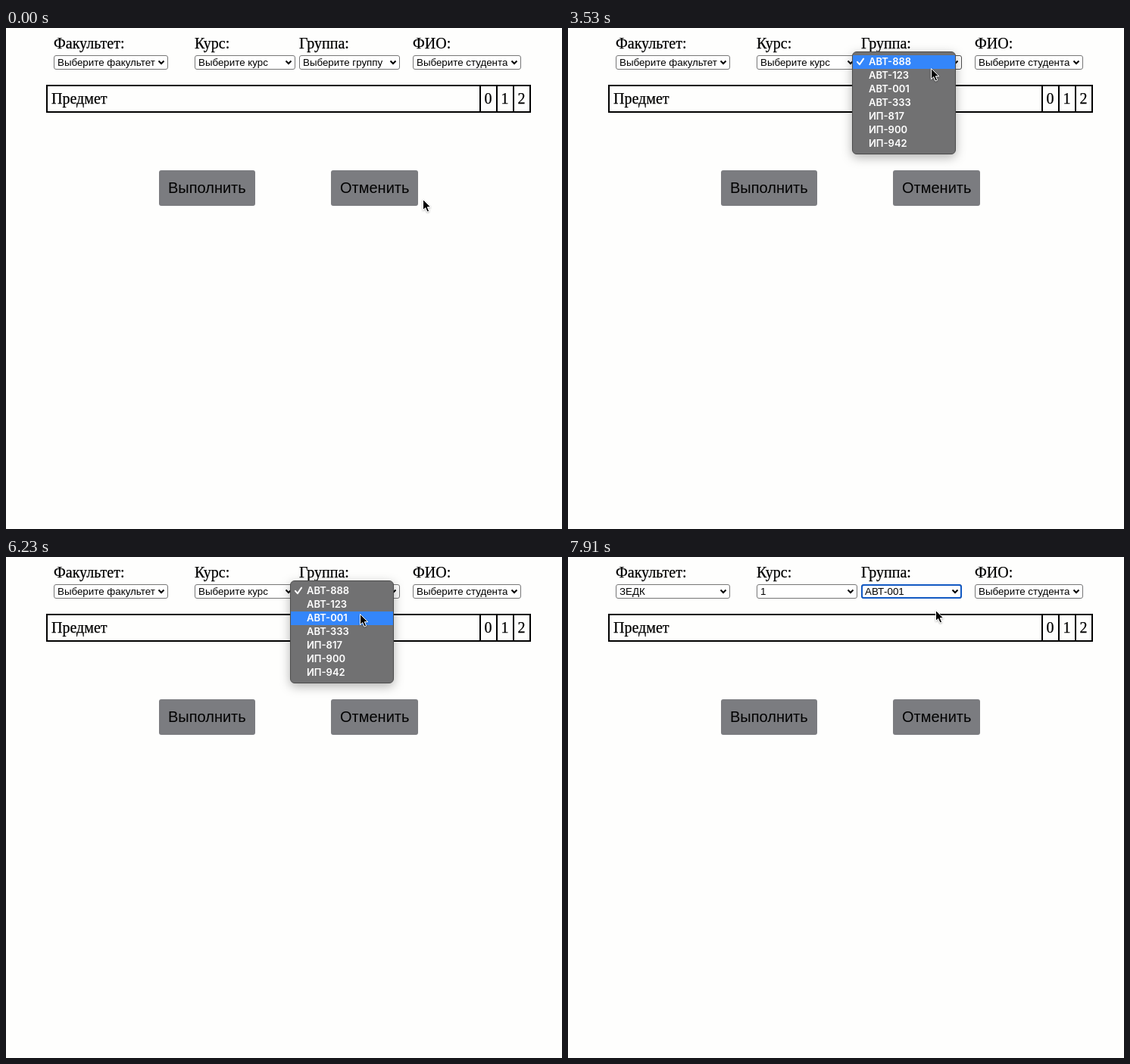
Write an HTML page that moves like this. It is 734 px wide and 662 px high and loops after 8000 ms.

```html
<!DOCTYPE html>
<html lang="ru">
<head>
<meta charset="utf-8">
<title>Выбор студента</title>
<style>
  html, body { margin: 0; width: 100%; height: 100%; overflow: hidden; background: #fefefd; }
  svg { display: block; width: 734px; height: 662px; }
  text { white-space: pre; }
  .serif { font: 20px "Liberation Serif", "Times New Roman", serif; stroke: #000; stroke-width: .25px; }
  .field { font: 13.333px "Liberation Sans", Arial, sans-serif; }
  .button { font: 20px "Liberation Sans", Arial, sans-serif; }
  .item { font: 600 13px Inter, sans-serif; fill: #fff; }
</style>
</head>
<body>
<svg id="stage" viewBox="0 0 734 662">
  <defs>
    <filter id="shadow" x="-30%" y="-30%" width="160%" height="160%">
      <feDropShadow dx="0" dy="4" stdDeviation="7" flood-color="#000" flood-opacity=".3"/>
    </filter>
    <filter id="soft" x="-50%" y="-50%" width="200%" height="200%">
      <feDropShadow dx="0" dy="1" stdDeviation="1.2" flood-color="#000" flood-opacity=".35"/>
    </filter>
  </defs>
</svg>
<script>
const LOOP = 8000;
const OPEN = 2850, FADE = 6930, CLOSED = 7170, PICKED = 7200;
const ROW_TOP = 36, ROW_H = 18;
const stage = document.getElementById('stage');

function add(parent, tag, attrs, content) {
  const el = document.createElementNS('http://www.w3.org/2000/svg', tag);
  for (const key in attrs) el.setAttribute(key, attrs[key]);
  if (content !== undefined) el.textContent = content;
  parent.appendChild(el);
  return el;
}

const label = (x, y, content, cls = 'serif', parent = stage) =>
  add(parent, 'text', { x, y, class: cls }, content);

function field(x, width, title, hint, value) {
  label(x, 27, title);
  const box = add(stage, 'rect', {
    x: x + .5, y: 36.5, width: width - 1, height: 18, rx: 2.5, fill: '#fff', stroke: '#767676'
  });
  const text = label(x + 5, 50, hint, 'field');
  add(stage, 'path', {
    d: `M${x + width - 12.5} 43.5l3.5 3.5 3.5-3.5`, fill: 'none', stroke: '#000', 'stroke-width': 2
  });
  return { box, text, hint, value };
}

function button(x, width, content) {
  add(stage, 'rect', { x, y: 188, width, height: 47, rx: 3, fill: '#7b7c80' });
  label(x + 12, 218, content, 'button');
}

const fields = [
  field(63, 151, 'Факультет:', 'Выберите факультет', 'ЗЕДК'),
  field(249, 133, 'Курс:', 'Выберите курс', '1'),
  field(387, 133, 'Группа:', 'Выберите группу', 'АВТ-001'),
  field(537, 143, 'ФИО:', 'Выберите студента', 'Выберите студента')
];
const group = fields[2].box;
const ring = add(stage, 'rect', {
  x: 388, y: 37, width: 131, height: 17, rx: 2.5, fill: 'none', stroke: '#1259c3', 'stroke-width': 2
});

add(stage, 'path', {
  d: 'M54 76H692V111H54ZM626 76V111M648 76V111M670 76V111',
  fill: 'none', stroke: '#000', 'stroke-width': 2
});
label(60, 100, 'Предмет');
['0', '1', '2'].forEach((n, i) => label(631.5 + 22 * i, 100, n));
button(202, 127, 'Выполнить');
button(429, 115, 'Отменить');

const menu = add(stage, 'g', {});
add(menu, 'rect', {
  x: 375.5, y: 31.5, width: 136, height: 135, rx: 5.5,
  fill: '#717172', stroke: '#4c4c4c', filter: 'url(#shadow)'
});
const mark = add(menu, 'rect', { x: 376, width: 135, height: ROW_H, fill: '#3486fa' });
add(menu, 'path', {
  d: 'M382 44.8l2.9 3.4 5.2-7.6', fill: 'none', stroke: '#fff', 'stroke-width': 2,
  'stroke-linecap': 'round', 'stroke-linejoin': 'round'
});
['АВТ-888', 'АВТ-123', 'АВТ-001', 'АВТ-333', 'ИП-817', 'ИП-900', 'ИП-942']
  .forEach((name, i) => label(397, 49 + ROW_H * i, name, 'item', menu));

const cursor = add(stage, 'path', {
  d: 'M.5 .5V14.6L3.7 11.6 6.1 17 8.6 15.9 6.3 10.7H10.7Z',
  fill: '#000', stroke: '#fff', 'stroke-width': 1, filter: 'url(#soft)'
});

// Pointer stops: time, x, y
const stops = [
  [0, 550, 226], [450, 550, 226], [800, 557, 204], [1230, 486, 50], [2500, 486, 50],
  [2800, 479, 53], [3650, 479, 53], [4200, 468, 98], [5400, 468, 98], [5950, 467, 75],
  [7250, 467, 75], [7700, 485, 70], [LOOP, 485, 70]
];

function pointerAt(t) {
  const i = stops.findIndex(s => s[0] > t);
  const [t0, x0, y0] = stops[i - 1], [t1, x1, y1] = stops[i];
  const u = (t - t0) / (t1 - t0), e = u * u * (3 - 2 * u);
  return [x0 + (x1 - x0) * e, y0 + (y1 - y0) * e];
}

function draw(t) {
  const [x, y] = pointerAt(t);
  cursor.setAttribute('transform', `translate(${x.toFixed(2)} ${y.toFixed(2)})`);

  const shown = t < OPEN ? 0 : Math.max(0, Math.min(1, (CLOSED - t) / (CLOSED - FADE)));
  menu.setAttribute('opacity', shown);
  menu.setAttribute('display', shown ? 'inline' : 'none');
  mark.setAttribute('y', ROW_TOP + ROW_H * Math.max(0, Math.floor((y - ROW_TOP) / ROW_H)));

  const picked = t >= PICKED;
  for (const f of fields) f.text.textContent = picked ? f.value : f.hint;
  ring.setAttribute('display', picked ? 'inline' : 'none');
  const over = x > 387 && x < 520 && y > 36 && y < 55;
  group.setAttribute('stroke', over ? '#4f4f4f' : '#767676');
}

function tick() {
  draw(performance.now() % LOOP);
  requestAnimationFrame(tick);
}
tick();
</script>
</body>
</html>
```
